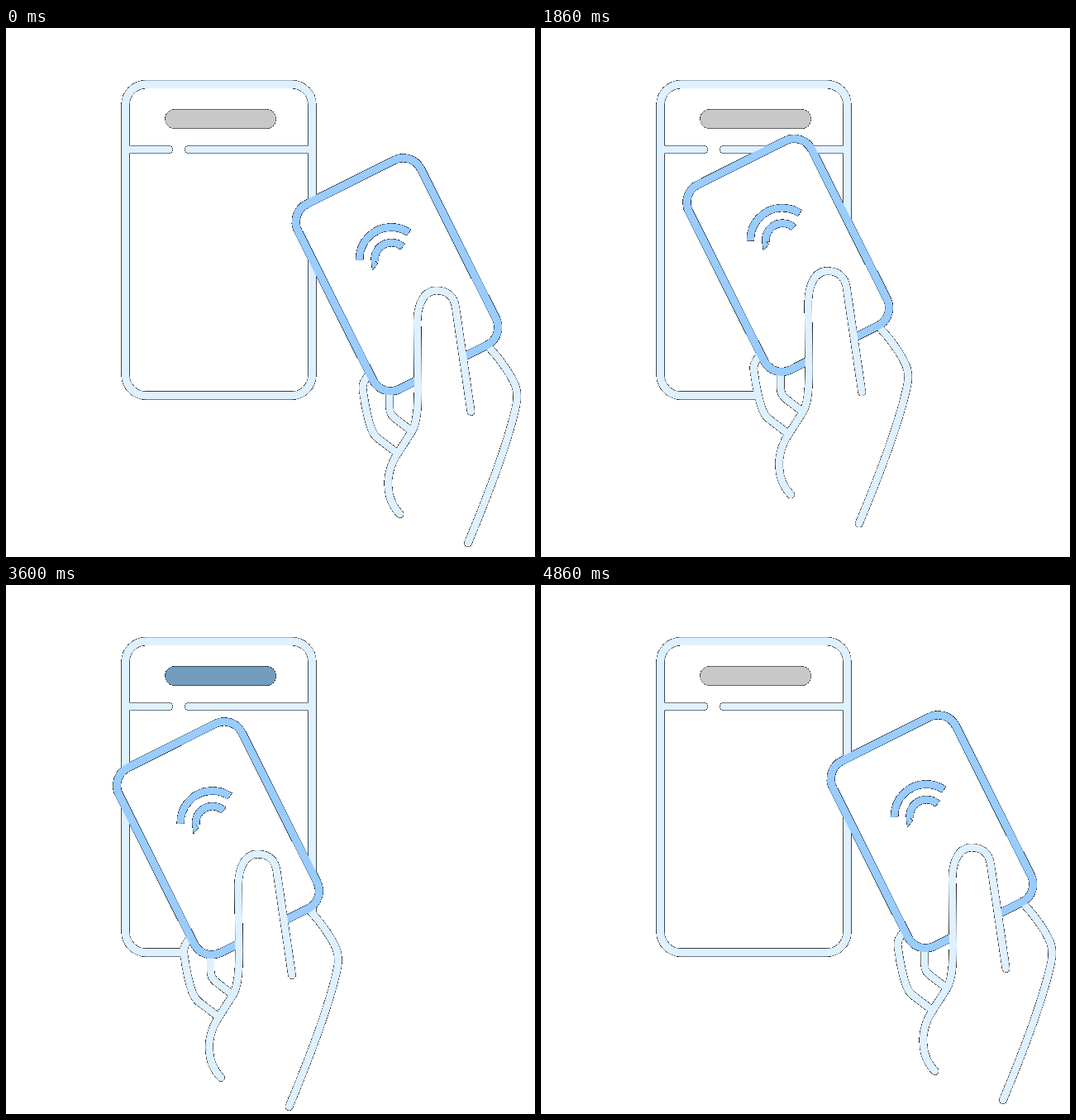
Recreate the animation shown at these times as an HTML page with a canvas. Size 640x640 px, loop 5.43 s.

```html
<!DOCTYPE html>
<html lang="en">
<head>
<meta charset="utf-8">
<title>Tap card</title>
<style>
  html, body { margin: 0; width: 100%; height: 100%; overflow: hidden; background: #fff; }
  canvas { display: block; }
</style>
</head>
<body>
<canvas width="640" height="640"></canvas>
<script>
const LOOP = 5430;
const PALE = '#dff0ff', BLUE = '#99ccff';
const GREY = [200, 200, 200], ACTIVE = [35, 117, 180];
const canvas = document.querySelector('canvas');
const ctx = canvas.getContext('2d', { willReadFrequently: true });

const shape = build => { const p = new Path2D(); build(p); return p; };

const phone = shape(p => p.roundRect(144.5, 68.1, 226, 376.5, 25));
const divider = new Path2D('M144.5 147H197M221 147H370.5');
const pill = shape(p => p.roundRect(192.6, 98.4, 134, 23.2, 11.6));

const card = shape(p => {
  const upright = shape(q => q.roundRect(-83.2, -125.2, 166.4, 250.4, 24));
  p.addPath(upright, new DOMMatrix().translate(473, 298.3).rotate(-26.7));
});
const waves = shape(p => {
  p.arc(466.2, 279.6, 38.6, Math.PI * 0.99, -Math.PI * 0.315);
  p.moveTo(446.4, 282.2);
  p.arc(466.2, 279.6, 20, Math.PI * 0.958, -Math.PI * 0.265);
});

const fingers = new Path2D(
  'M440 418C432 428 430.5 432 432 440C434 454 438 474 442 485C444 490 447 494 450 496.5L473 514' +
  'M464 440V458C464 466 467 469 471 472.5L490 487');
const wrist = new Path2D(
  'M586 388C600 403 612 422 616 432C620 443 618.5 452 615.5 464C605 508 582 568 559 623');
const thumb = new Path2D(
  'M562.5 464L544 338C542 324 533 317.5 521 317.5C505 317.5 498 335 497.5 355L498.5 435' +
  'C498.5 462 497 478 491 488L473 516C464 530 461.5 545 462.5 555C463 568 468 579 476.5 588');
const palm = new Path2D('M440 418L431 436L442 488L472 514L560 600L618 443L586 388Z');

function bezier(a, b, c, d, s) {
  const r = 1 - s;
  return a * r * r * r + 3 * b * r * r * s + 3 * c * r * s * s + d * s * s * s;
}

// Cubic easing with control points (x1, 0) and (x2, 1)
function ease(x, x1, x2) {
  if (x <= 0) return 0;
  if (x >= 1) return 1;
  let lo = 0, hi = 1;
  for (let i = 0; i < 24; i++) {
    const mid = (lo + hi) / 2;
    if (bezier(0, x1, x2, 1, mid) < x) lo = mid; else hi = mid;
  }
  return bezier(0, 0, 1, 1, lo);
}

function handOffset(t) {
  const s = ease((t - 1250) / 880, 0.47, 0.6) - ease((t - 4125) / 730, 0.39, 0.73);
  return [bezier(0, -80, -155, -216.5, s), bezier(0, -39, -57, 8, s)];
}

function pillColor(t) {
  const x = (t - 2380) / 1400;
  const k = x > 0 && x < 1 ? (1 - Math.cos(x * 4 * Math.PI)) / 2 : 0;
  return `rgb(${GREY.map((g, i) => Math.round(g + (ACTIVE[i] - g) * k))})`;
}

function stroke(path, color, width) {
  ctx.strokeStyle = color;
  ctx.lineWidth = width;
  ctx.stroke(path);
}

function erase(path) {
  ctx.globalCompositeOperation = 'destination-out';
  ctx.fill(path);
  ctx.globalCompositeOperation = 'source-over';
}

// Soft edge pixels become opaque over black, giving the thin dark outline
function hardenEdges() {
  const image = ctx.getImageData(0, 0, 640, 640), px = image.data;
  for (let i = 0; i < px.length; i += 4) {
    const a = px[i + 3];
    if (a === 0 || a === 255) continue;
    const k = a / 255;
    px[i] *= k;
    px[i + 1] *= k;
    px[i + 2] *= k;
    px[i + 3] = a > 16 ? 255 : 0;
  }
  ctx.putImageData(image, 0, 0);
}

function draw(t) {
  ctx.setTransform(1, 0, 0, 1, 0, 0);
  ctx.clearRect(0, 0, 640, 640);
  ctx.lineCap = 'round';
  stroke(phone, PALE, 9.6);
  stroke(divider, PALE, 9.2);
  ctx.fillStyle = pillColor(t);
  ctx.fill(pill);

  ctx.translate(...handOffset(t));
  erase(palm);
  stroke(fingers, PALE, 9);
  stroke(wrist, PALE, 9);
  erase(card);
  stroke(card, BLUE, 9.4);
  ctx.lineCap = 'butt';
  stroke(waves, BLUE, 8.8);
  ctx.lineCap = 'round';
  erase(thumb);
  stroke(thumb, PALE, 9);
  hardenEdges();
}

function tick() {
  draw(performance.now() % LOOP);
  requestAnimationFrame(tick);
}
tick();
</script>
</body>
</html>
```
